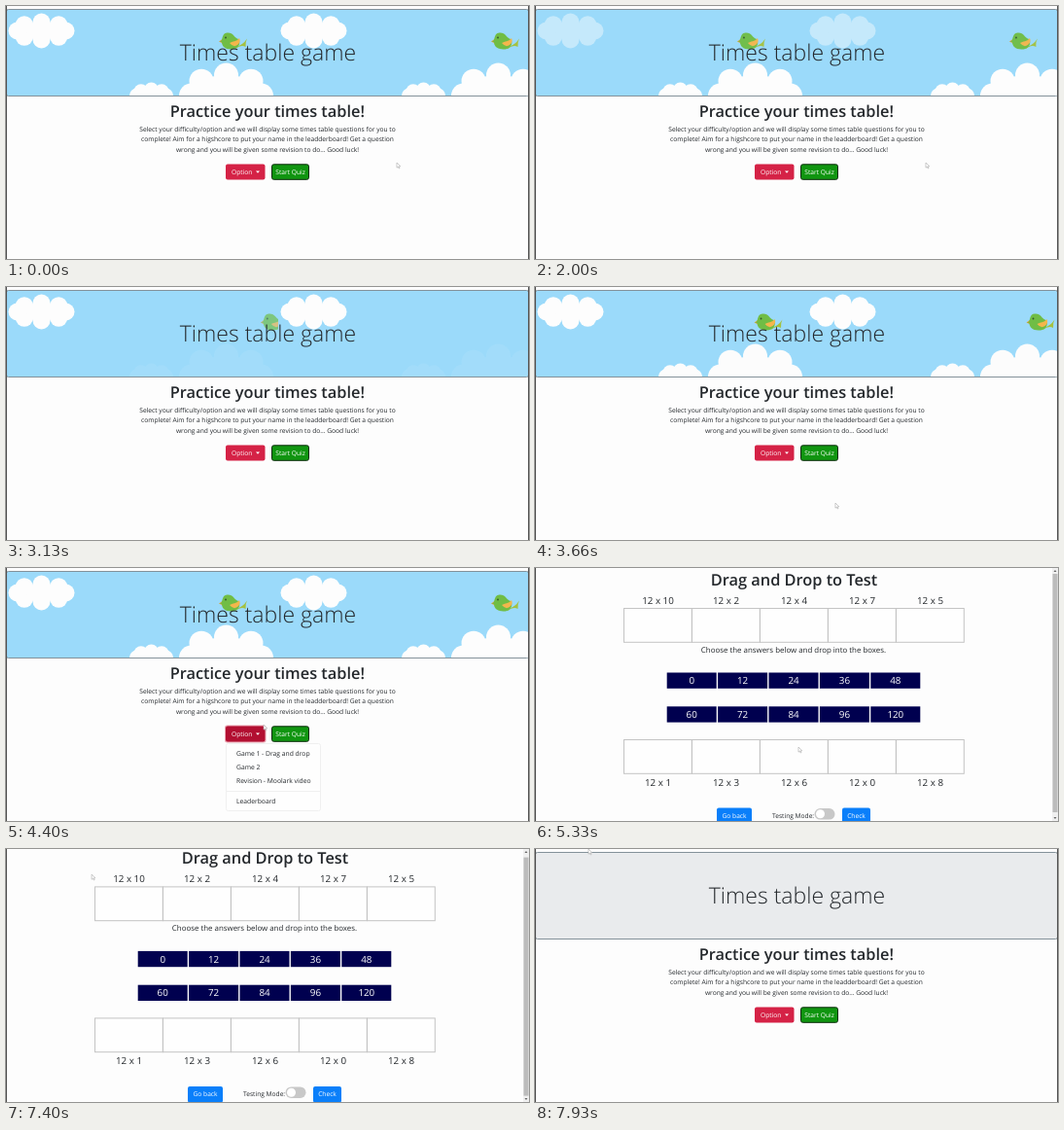
An HTML page that plays this animation: 538x260 px, repeating every 8000 ms.

```html
<!DOCTYPE html>
<html lang="en">
<head>
<meta charset="utf-8">
<title>Times table game</title>
<style>
  html, body { margin: 0; width: 100%; height: 100%; overflow: hidden; background: #fdfdfd; }
  svg { display: block; width: 538px; height: 260px; }
  text { font-family: "Open Sans", "Noto Sans", sans-serif; font-size: 6.65px; fill: #24282c; text-rendering: geometricPrecision; }
  .mid { text-anchor: middle; }
  .title { font-size: 23px; font-weight: 300; }
  .heading { font-size: 16.35px; font-weight: 600; }
  .large { font-size: 9.8px; }
  .light { fill: #fff; }
  #menu text { font-size: 6.75px; }
</style>
</head>
<body>
<svg viewBox="0 0 538 260">
  <defs>
    <clipPath id="tileClip"><rect x="0" y="4" width="280" height="88"/></clipPath>
    <clipPath id="bannerClip"><rect x="1" y="4" width="536" height="88"/></clipPath>
  </defs>
  <rect width="538" height="260" fill="#fdfdfd"/>

  <g id="home">
    <rect id="banner" x=".5" y="3.5" width="537" height="89" rx="2" stroke="#84929a"/>
    <g id="sky" clip-path="url(#bannerClip)">
      <g id="tile">
        <g clip-path="url(#tileClip)">
          <g id="topCloud" fill="#fdfdfd"></g>
          <g id="lowClouds" fill="#fdfdfd"></g>
          <g id="bird">
            <path d="M219 36.500 224 33V39Z" fill="#e9a13b"/>
            <path d="M236 42Q243 41 248 33.500 246 37 246.500 42 242 39 236 44Z" fill="#a5c13f"/>
            <path d="M219.500 37C224 36 221 28 227.500 27.500 234 27 234 32 239 34 242 37 240 44.500 231.500 44.500 225 44.500 222 41 222 37Z" fill="#70bd45"/>
            <path d="M230 38C233 36 237 37 240 33Q242 37 238 40 234 43 230 38Z" fill="#f4b64c"/>
            <circle cx="226" cy="32.500" r=".9" fill="#31552a"/>
          </g>
        </g>
      </g>
      <use href="#tile" x="280"/>
    </g>
    <text class="mid title" x="269.500" y="56">Times table game</text>
    <text class="mid heading" x="268.800" y="113.500">Practice your times table!</text>
    <text class="mid" x="269" y="128.500">Select your difficulty/option and we will display some times table questions for you to</text>
    <text class="mid" x="269" y="139">complete! Aim for a higshcore to put your name in the leadderboard! Get a question</text>
    <text class="mid" x="269" y="149.500">wrong and you will be given some revision to do... Good luck!</text>
    <rect id="ring" x="225" y="161.500" width="42.500" height="18" rx="2.500" fill="#eaa3b0"/>
    <rect id="option" x="226" y="162.500" width="40.500" height="16" rx="2"/>
    <text class="light" x="232" y="173">Option</text>
    <path d="M257 169.500h4l-2 2.200z" fill="#fff"/>
    <rect x="273.500" y="162.800" width="38" height="15.500" rx="2" fill="#109510" stroke="#0b2b0b"/>
    <text class="mid light" x="292.500" y="173">Start Quiz</text>
    <g id="menu">
      <rect x="226.500" y="180.500" width="97" height="69" rx="2" fill="#fefefe" stroke="#ececec" stroke-width=".8"/>
      <path d="M227 229.500h96" stroke="#f0f0f0"/>
      <text x="237" y="193">Game 1 - Drag and drop</text>
      <text x="237" y="207">Game 2</text>
      <text x="237" y="221">Revision - Moolark video</text>
      <text x="237" y="242.300">Leaderboard</text>
    </g>
    <rect x="537" width="1" height="260" fill="#555"/>
  </g>

  <g id="game">
    <g id="sheet">
      <text class="mid heading" x="266.500" y="17.500">Drag and Drop to Test</text>
      <g id="board"></g>
      <text class="mid" style="font-size:7.9px" x="266" y="86.500">Choose the answers below and drop into the boxes.</text>
      <rect x="187" y="246.500" width="36" height="16.500" rx="2" fill="#0a7ffa"/>
      <text class="mid light" x="205" y="257">Go back</text>
      <text x="244" y="257">Testing Mode:</text>
      <rect x="287.500" y="247" width="21" height="11.600" rx="5.800" fill="#c8c8c8"/>
      <circle cx="293.500" cy="252.800" r="4.500" fill="#fff"/>
      <rect x="316" y="246.500" width="29" height="16.500" rx="2" fill="#0a7ffa"/>
      <text class="mid light" x="330.500" y="257">Check</text>
    </g>
    <rect x="532" width="6" height="260" fill="#f0f0f0"/>
    <rect id="thumb" x="532.500" y="6" width="5" height="245" fill="#bcbcbc"/>
    <path d="M533.500 4h3l-1.500-2zM533.500 256h3l-1.500 2z" fill="#666"/>
  </g>

  <rect width="1" height="260" fill="#555"/>
  <path id="cursor" d="M0 0V5.200L1.300 4.100 2.200 6 3 5.600 2.200 3.800H3.800Z" fill="#fff" stroke="#aaa" stroke-width=".6"/>
</svg>
<script>
const DURATION = 8000;
const el = id => document.getElementById(id);
const set = (id, name, value) => el(id).setAttribute(name, value);
const show = (id, on) => set(id, "display", on ? "inline" : "none");

// A cloud is a ring of eight round puffs about a filled middle.
function cloud(cx, cy, rx, ry, puff) {
  let shapes = `<ellipse cx="${cx}" cy="${cy}" rx="${rx}" ry="${ry}"/>`;
  for (let angle = 0; angle < 2 * Math.PI; angle += Math.PI / 4) {
    shapes += `<circle cx="${cx + rx * Math.cos(angle)}" cy="${cy + ry * Math.sin(angle)}" r="${puff}"/>`;
  }
  return shapes;
}
el("topCloud").innerHTML = cloud(36.5, 25.5, 25, 9, 9);
el("lowClouds").innerHTML = cloud(226.5, 92, 36, 21, 12.5) + cloud(149.5, 92, 15, 6, 7.5);

const label = (x, y, text, tone = "") => `<text class="mid large ${tone}" x="${x}" y="${y}">${text}</text>`;
const dropRow = (factors, boxY, labelY) => factors.map((n, i) =>
  `<rect x="${91.5 + 70 * i}" y="${boxY}" width="69.800" height="34.800" fill="#fefefe" stroke="#c4c4c4"/>` +
  label(126.5 + 70 * i, labelY, `12 x ${n}`)).join("");
const answerRow = (factors, y) => factors.map((n, i) =>
  `<rect x="${135.7 + 52.4 * i}" y="${y}" width="51" height="16.300" fill="#00004f"/>` +
  label(161.2 + 52.4 * i, y + 11.7, 12 * n, "light")).join("");

el("board").innerHTML =
  dropRow([10, 2, 4, 7, 5], 41.5, 36.5) + dropRow([1, 3, 6, 0, 8], 176.5, 223.5) +
  answerRow([0, 1, 2, 3, 4], 107.5) + answerRow([5, 6, 7, 8, 10], 142.3);

const progress = (t, from, to) => Math.min(1, Math.max(0, (t - from) / (to - from)));
const ease = (t, from, to) => {
  const p = progress(t, from, to);
  return p * p * (3 - 2 * p);
};
// Fades out over one span and back in over another.
const blink = (t, out, gone, back, full) => 1 - ease(t, out, gone) + ease(t, back, full);

// The bird speeds off to the left, then slows down as it returns from the right.
const birdShift = t => t < 2400
  ? -44 * progress(t, 1600, 2400) ** 2
  : 75 * (1 - progress(t, 2850, 4000)) ** 2;

function cursorAt(t) {
  let x = 402, y = 161;
  const glide = (toX, toY, from, to) => {
    const p = progress(t, from, to);
    x += (toX - x) * p;
    y += (toY - y) * p;
  };
  glide(340, 265, 2460, 2900);
  glide(265, 161, 3330, 4130);
  glide(271, 184, 4400, 4730);
  glide(392, 265, 6000, 6400);
  glide(55, 0, 6860, 7460);
  return `translate(${x} ${y})`;
}

function draw(t) {
  const loaded = t < 7930;
  const playing = t >= 5000 && loaded;
  const menuOpen = t >= 4200 && t < 5000;
  show("home", !playing);
  show("game", playing);
  show("sky", loaded);
  show("menu", menuOpen);
  show("ring", menuOpen);
  set("banner", "fill", loaded ? "#9bdafa" : "#e9ebed");
  set("option", "fill", menuOpen ? "#b20f31" : "#d52246");
  set("topCloud", "opacity", blink(t, 1700, 2250, 2460, 2950));
  set("lowClouds", "opacity", blink(t, 2030, 2400, 3020, 3700));
  set("bird", "opacity", blink(t, 1950, 2350, 2850, 3300));
  set("bird", "transform", `translate(${birdShift(t)} 0)`);
  const scroll = 2.6 * ease(t, 6150, 6350);
  set("sheet", "transform", `translate(0 ${-scroll})`);
  set("thumb", "y", 6 + scroll);
  set("cursor", "transform", cursorAt(t));
}

const start = performance.now();
function frame() {
  draw((performance.now() - start) % DURATION);
  requestAnimationFrame(frame);
}
frame();
</script>
</body>
</html>
```
